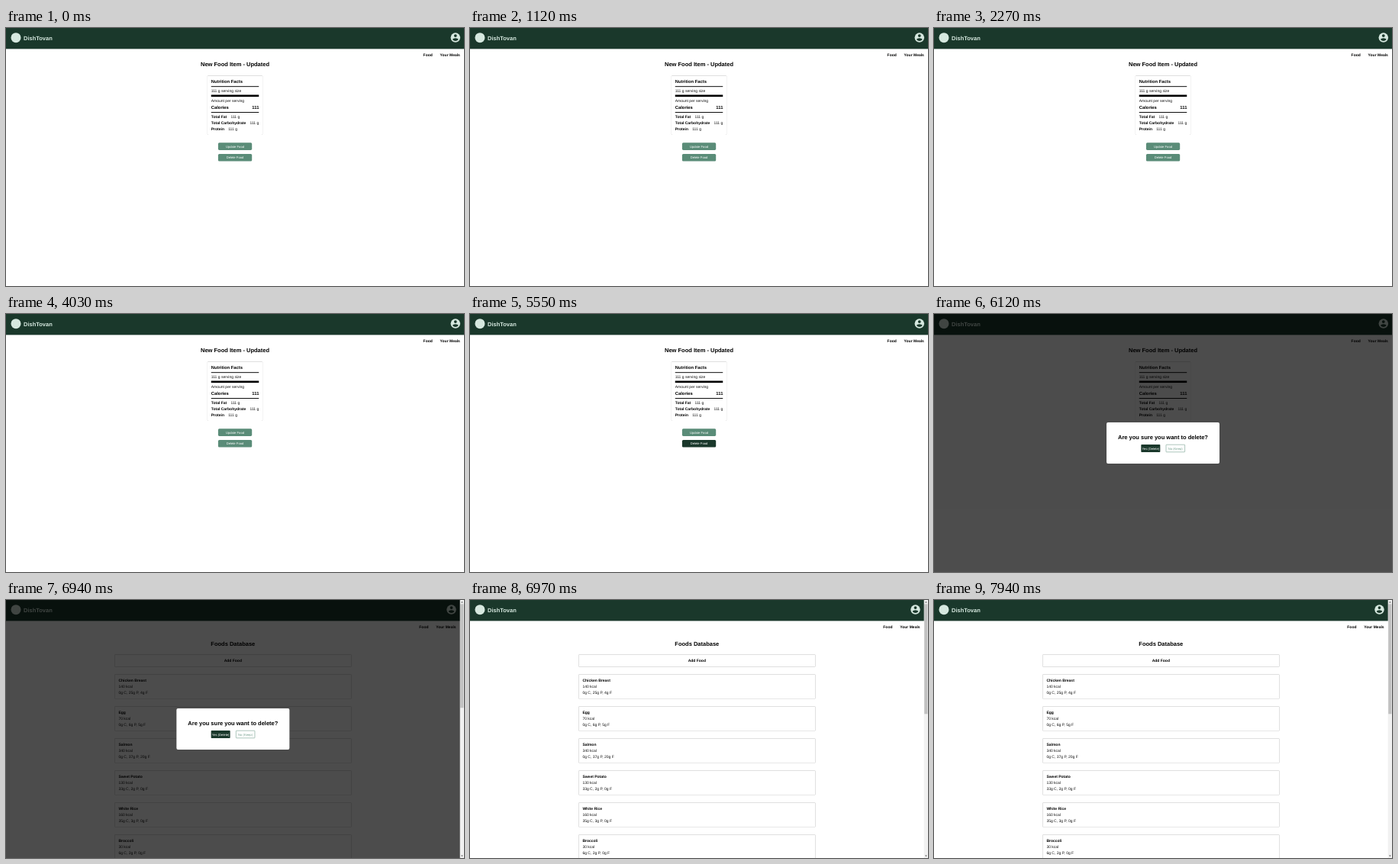
An HTML page for the animation above (8000 ms loop, 600 by 338 pixels).

```html
<!DOCTYPE html>
<html lang="en">
<head>
<meta charset="utf-8">
<title>Food tracker</title>
<style>
  html, body { margin: 0; width: 100%; height: 100%; overflow: hidden; background: #fff; }
  svg { display: block; width: 100vw; height: 100vh; }
  text { font: 5px "Liberation Sans", Arial, sans-serif; text-rendering: geometricPrecision; fill: #111; }
  .bold { font-weight: 700; fill: #000; }
  .title { font-size: 7.5px; }
  .sub { font-size: 5.85px; }
  .button { font-size: 4.167px; fill: #fff; }
  .mid { text-anchor: middle; }
  .end { text-anchor: end; }
  .card { fill: #fff; filter: drop-shadow(.35px .65px .6px rgba(0, 0, 0, .5)); }
</style>
</head>
<body>
<svg id="stage" viewBox="0 0 600 338" preserveAspectRatio="none"></svg>
<script>
const LOOP = 8000;
const HOVER_DELETE = 5260, OPEN_MODAL = 5580, HOVER_YES = 5970, SHOW_LIST = 6850, CLOSE_MODAL = 6970;
const FADE = 150;
const SCROLLBAR = 5.3;
const GREEN = [90, 140, 120], DARK = [26, 56, 43], MINT = "#d6e8df";
const rgb = c => `rgb(${c.map(Math.round)})`;

const foods = [
  ["Chicken Breast", 140, 0, 25, 4],
  ["Egg", 70, 0, 6, 5],
  ["Salmon", 340, 0, 37, 20],
  ["Sweet Potato", 130, 33, 2, 0],
  ["White Rice", 160, 35, 3, 0],
  ["Broccoli", 30, 6, 2, 0]
];

const text = (x, y, str, cls = "", attrs = "") => `<text x="${x}" y="${y}" class="${cls}" ${attrs}>${str}</text>`;
const rect = (x, y, w, h, attrs = "") => `<rect x="${x}" y="${y}" width="${w}" height="${h}" ${attrs}/>`;
const group = (id, content) => `<g id="${id}">${content}</g>`;
const card = (x, y, w, h, r) => rect(x, y, w, h, `rx="${r}" class="card"`);

const fact = (y, label, valueX) => text(268.75, y, label, "bold") + text(valueX, y, "111 g");

const header =
  rect(0, 0, 600, 27.4, `fill="${rgb(DARK)}"`) +
  `<circle cx="13" cy="12.7" r="6.5" fill="${MINT}"/>` +
  text(23, 16.4, "DishTovan", "bold title", `style="fill:${MINT}"`);

const nav = group("nav",
  `<g transform="translate(588.8 12.6)">
    <circle r="6.25" fill="${MINT}"/>
    <g fill="${rgb(DARK)}">
      <circle cy="-2.5" r="1.9"/>
      <path d="M-3.75 2.5C-3.7 1.25-1.25.56 0 .56S3.7 1.25 3.75 2.5C2.95 3.7 1.56 4.5 0 4.5S-2.95 3.7-3.75 2.5Z"/>
    </g>
  </g>` +
  text(546.6, 37, "Food", "bold") + text(568.6, 37, "Your Meals", "bold"));

const detail = group("detail",
  text(300, 50, "New Food Item - Updated", "bold title mid") +
  card(263.9, 62.4, 72.2, 77.6, 1.2) +
  text(268.75, 72.4, "Nutrition Facts", "bold sub") +
  rect(268.75, 76.2, 62.5, 0.95) +
  text(268.75, 83.9, "111 g serving size") +
  rect(268.75, 87.5, 62.5, 2.6) +
  text(268.75, 97.1, "Amount per serving") +
  text(268.75, 106, "Calories", "bold sub") +
  text(331.4, 106, "111", "bold sub end") +
  rect(268.75, 110, 62.5, 0.95) +
  fact(117.7, "Total Fat", 294.5) +
  fact(125.9, "Total Carbohydrate", 319.5) +
  fact(133.9, "Protein", 291.2) +
  rect(277.9, 150.3, 44.3, 9.6, `rx="1.6" fill="${rgb(GREEN)}"`) +
  text(300, 156.6, "Update Food", "button mid") +
  rect(277.9, 165, 44.3, 9.6, `rx="1.6" id="deleteButton"`) +
  text(300, 171.3, "Delete Food", "button mid"));

const foodCard = ([name, kcal, carbs, protein, fat], i) => {
  const y = 97.5 + 42 * i;
  return card(142.4, y, 310, 31.8, .6) +
    text(147.4, y + 9.6, name, "bold") +
    text(147.4, y + 17.7, `${kcal} kcal`) +
    text(147.4, y + 25.7, `${carbs}g C, ${protein}g P, ${fat}g F`);
};

const list = group("list",
  text(297.3, 60, "Foods Database", "bold title mid") +
  card(142.4, 71.6, 310, 15.8, .6) +
  text(297.3, 81.4, "Add Food", "bold mid") +
  foods.map(foodCard).join(""));

const modal = group("modal",
  rect(0, 0, 600, 338, `fill-opacity=".7"`) +
  group("dialog",
    rect(226, 142, 148, 54, `rx="2" fill="#fff"`) +
    text(300, 164, "Are you sure you want to delete?", "bold title mid") +
    rect(271.3, 171, 25, 10, `rx=".8" id="yesButton"`) +
    text(283.8, 177.5, "Yes (Delete)", "button mid") +
    rect(304, 171.2, 24.6, 9.6, `rx=".6" fill="#fff" stroke="${rgb(GREEN)}" stroke-width=".5"`) +
    text(316.2, 177.5, "No (Keep)", "button mid", `style="fill:#76a08f"`)));

const scrollbar = group("scrollbar",
  rect(594.7, 0, SCROLLBAR, 338, `fill="#f1f1f1"`) +
  rect(595.2, 5.3, 4.3, 144, `fill="#c1c1c1" id="thumb"`) +
  `<path d="M596 3.4l1.4-1.6 1.4 1.6ZM596 334.6l1.4 1.6 1.4-1.6Z" fill="#606060"/>`);

document.getElementById("stage").innerHTML = header + nav + detail + list + modal + scrollbar;

const el = id => document.getElementById(id);
const show = (id, on) => el(id).setAttribute("display", on ? "inline" : "none");
const shift = (id, dx) => el(id).setAttribute("transform", `translate(${dx} 0)`);
const darken = (id, t, start) => {
  const k = Math.min(1, Math.max(0, (t - start) / FADE));
  el(id).setAttribute("fill", rgb(GREEN.map((c, i) => c + (DARK[i] - c) * k)));
};

function draw(t) {
  const onList = t >= SHOW_LIST;
  const modalOpen = t >= OPEN_MODAL && t < CLOSE_MODAL;
  show("detail", !onList);
  show("list", onList);
  show("scrollbar", onList);
  show("modal", modalOpen);
  shift("nav", onList ? -SCROLLBAR : 0);
  shift("dialog", onList ? -SCROLLBAR / 2 : 0);
  darken("deleteButton", t, HOVER_DELETE);
  darken("yesButton", t, HOVER_YES);
  // The list is one item longer until the dialog closes.
  el("thumb").setAttribute("height", modalOpen ? 136 : 144);
}

const startTime = performance.now();
function tick() {
  draw((performance.now() - startTime) % LOOP);
  requestAnimationFrame(tick);
}
tick();
</script>
</body>
</html>
```
